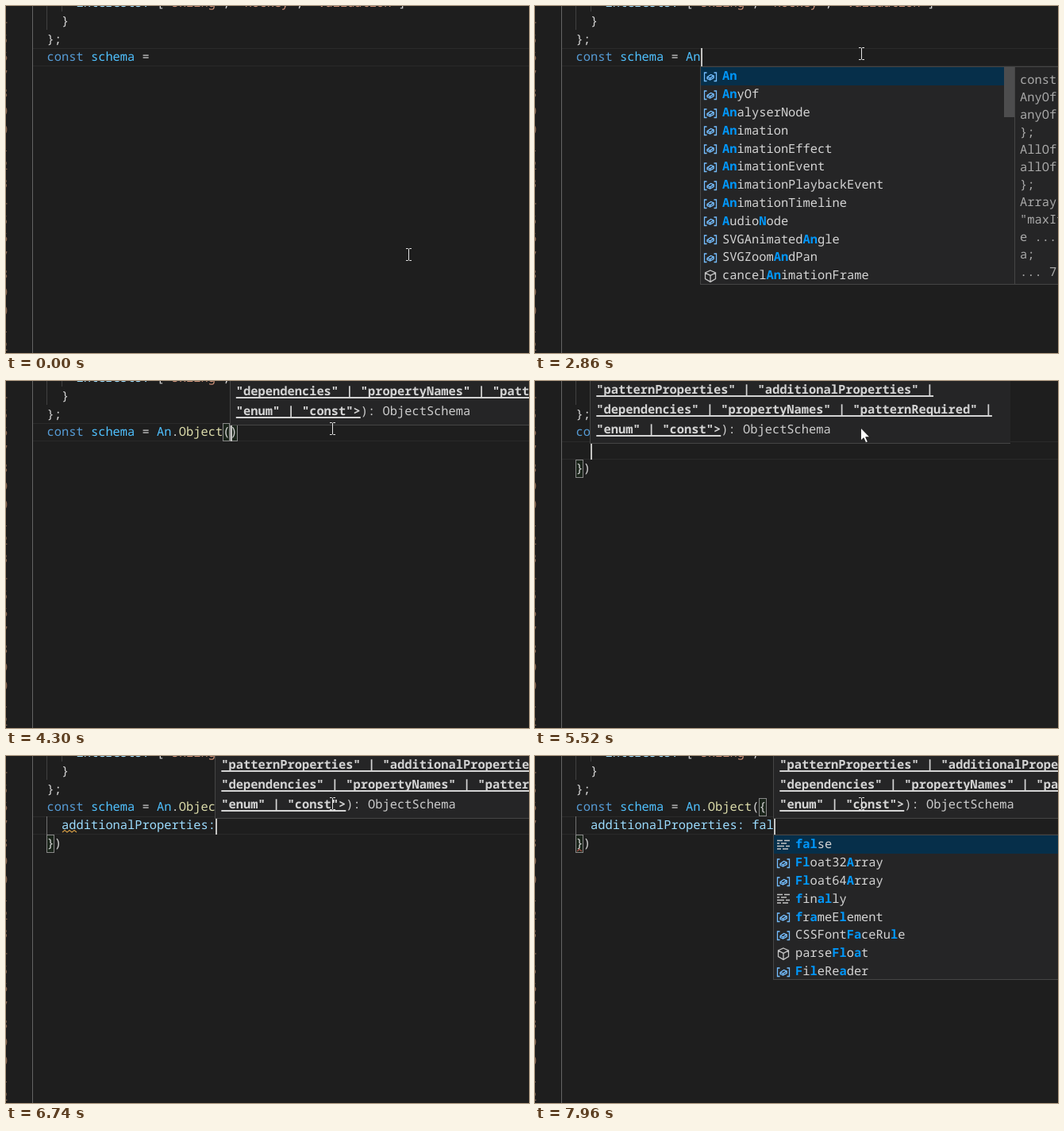
An HTML page for the animation above (8000 ms loop, 659 by 437 pixels).

```html
<!DOCTYPE html>
<html lang="en">
<head>
<meta charset="utf-8">
<title>Editor typing</title>
<style>
html, body { margin: 0; width: 100%; height: 100%; overflow: hidden; background: #1e1e1e; }
#stage {
  position: relative; width: 659px; height: 437px; overflow: hidden; background: #1e1e1e; color: #d4d4d4;
  font: 15.4px/22.8px "Noto Sans Mono", "DejaVu Sans Mono", monospace;
  text-rendering: geometricPrecision; font-variant-ligatures: none; white-space: pre;
}
#stage div, #stage svg { position: absolute; box-sizing: border-box; }
#stage svg { overflow: visible; fill: none; }
.kw { color: #569cd6; }
.var { color: #4fc1ff; }
.prop { color: #9cdcfe; }
.str { color: #ce9178; }
.fn { color: #dcdcaa; }
.num { color: #8c6a54; }
.rule { width: 1px; background: #646464; }
.guide { width: 1px; background: #404040; }
.active { background: #707070; }
.line { width: 625px; height: 23px; border: solid #2a2a2a; border-width: 1px 0; }
.match { width: 9.6px; height: 23px; border: 1px solid #888; background: rgba(0, 100, 0, .1); }
.caret { width: 2px; height: 23px; background: #c4c4c2; }
.pop { background: #252526; border: 1px solid #454545; overflow: hidden; }
.sig { width: 530px; height: 320px; border-right: 0; line-height: 25px; color: #ccc; }
.sig b { color: #d4d4d4; text-decoration: underline; text-decoration-thickness: 1.5px; text-underline-offset: 2px; text-decoration-skip-ink: none; }
.list { width: 397px; }
.row { left: 0; width: 100%; height: 22.8px; }
.row:first-child { background: #062f4a; }
.row span { position: absolute; left: 27px; top: .4px; }
.row b { color: #0097fb; }
.row svg { left: 3px; top: 4px; width: 18px; height: 16px; stroke-width: 1.3; }
.thumb { right: 0; top: 0; width: 13px; height: 63px; background: #4d4d4e; }
.docs { width: 300px; color: #a9a9a9; line-height: 22px; padding: 5px 6px; }
</style>
</head>
<body>
<div id="stage"><div id="back"></div><div id="view"></div><div id="mouse"></div></div>
<script>
const LOOP = 8000, CW = 9.24, LH = 22.8, LEFT = 51.5, TOP = 53;
const $ = id => document.getElementById(id);
const colX = col => LEFT + col * CW;
const lineY = n => TOP + n * LH;
const box = (cls, x, y, html = '', style = '') =>
  `<div class="${cls}" style="left:${x}px;top:${y}px;${style}">${html}</div>`;
const text = (n, col, html) => box('', colX(col), lineY(n) + .3, html);
const span = (cls, s) => `<span class="${cls}">${s}</span>`;

const icons = {
  v: ['#75beff', 'M4.500 3H1.500v10.500H4.500M13.500 3h3v10.500h-3M5 8.500L9.600 5.500l3.600 1.400v2.600L8.600 12 5 10.500zM5 8.500l3.600 1.300 4.600-2.900M8.600 9.800V12'],
  m: ['#c5c5c5', 'M9 1l6.500 3v7.600L9 15.400l-6.500-3.800V4zM2.500 4L9 7.400 15.500 4M9 7.400v8'],
  k: ['#c5c5c5', 'M1 2.500h7M10 2.500h7M1 6h3M6 6h7M1 9.500h9M12 9.500h5M1 13h5M8 13h7']
};

// Leading letter picks the icon; underscores toggle the matched part.
const lists = {
  a: 'v_A_n|v_A_nyOf|v_A_bortController|v_A_bortSignal|v_A_nalyserNode|v_A_nimation|v_A_nimationEffect|v_A_nimationEvent|v_A_rray|v_A_rrayBuffer|v_A_ttr|v_A_udioNode',
  an: 'v_An_|v_An_yOf|v_An_alyserNode|v_An_imation|v_An_imationEffect|v_An_imationEvent|v_An_imationPlaybackEvent|v_An_imationTimeline|v_A_udio_N_ode|vSVGAnimated_An_gle|vSVGZoom_An_dPan|mcancel_An_imationFrame',
  dot: 'mAllOf|mAnyOf|mArray|mBoolean|mInteger|mNull|mNumber|mObject|mOneOf|mString',
  ob: 'm_Ob_ject',
  p: 'v_a_dditionalProperties|v_a_llOf|v_a_nyOf|vp_a_tternProperties|vp_a_tternRequired|vdef_a_ult|v_A_n|v_A_nyOf|v_A_nalyserNode|v_A_nimation|v_A_rray|v_A_udioNode',
  pad: 'v_add_itionalProperties|m_add_EventListener',
  f: 'k_f_alse|k_f_inally|k_f_or|k_f_unction|v_F_ile|v_F_ileList|v_F_ileReader|v_F_loat32Array|v_F_loat64Array|v_F_ormData|v_f_rameElement|v_F_unction',
  fa: 'k_fa_lse|v_F_lo_a_t32Array|v_F_lo_a_t64Array|k_f_in_a_lly|v_f_r_a_meElement|vCSSFont_Fa_ceRule|mparse_F_lo_a_t|v_F_ileRe_a_der',
  fal: 'k_fal_se|v_Fl_oat32_A_rray|v_Fl_oat64_A_rray|k_f_in_al_ly|v_f_r_a_meE_l_ement|vCSSFont_Fa_ceRu_l_e|mparse_Fl_o_a_t|v_F_i_l_eRe_a_der'
};
const docs = 'const An: {\nAnyOf: (\nanyOf: [\n};\nAllOf: (\nallOf: [\n};\nArray: (\n"maxItems"\ne ... 12\na;\n... 7 more';

const obj = 'An.Object({', add = 'additionalProperties';
// t, first-line tail, caret column, then extras: second line, caret off, signature [col, line], list, docs, bracket boxes, arrow pointer
const states = [
  [0, '', 15, { off: 1 }],
  [1020, '', 15],
  [1440, '', 15, { off: 1 }],
  [1840, '', 15],
  [2440, 'A', 16, { list: 'a', docs: 1 }],
  [2860, 'An', 17, { list: 'an', docs: 1 }],
  [3080, 'An.', 18],
  [3280, 'An.', 18, { list: 'dot' }],
  [3680, 'An.Ob', 20, { list: 'ob' }],
  [3880, 'An.Object', 24],
  [4300, 'An.Object()', 25, { sig: [25, 0], match: [[0, 24], [0, 25]] }],
  [4500, obj + '})', 26, { sig: [25, 0], match: [[0, 25], [0, 26]] }],
  [4700, obj + '})', 26, { sig: [26, 0], match: [[0, 25], [0, 26]] }],
  [4920, obj + '})', 26, { off: 1, sig: [26, 0], match: [[0, 25], [0, 26]] }],
  [5320, obj, 2, { next: '', sig: [26, 0] }],
  [5520, obj, 2, { next: '', sig: [2, 1], arrow: 1 }],
  [5740, obj, 3, { next: 'a', sig: [2, 1], arrow: 1, list: 'p' }],
  [5940, obj, 5, { next: 'add', sig: [3, 1], arrow: 1, list: 'pad' }],
  [6140, obj, 22, { next: add, sig: [5, 1], arrow: 1 }],
  [6340, obj, 22, { next: add, sig: [22, 1], warn: 1 }],
  [6740, obj, 23, { next: add + ':', sig: [23, 1], warn: 1 }],
  [6940, obj, 24, { next: add + ': ', sig: [23, 1], warn: 1 }],
  [7160, obj, 25, { next: add + ': f', sig: [24, 1], list: 'f' }],
  [7360, obj, 26, { next: add + ': fa', sig: [25, 1], list: 'fa' }],
  [7560, obj, 26, { next: add + ': fa', sig: [26, 1], list: 'fa' }],
  [7760, obj, 27, { next: add + ': fal', sig: [26, 1], list: 'fal', err: 1 }],
  [7960, obj, 27, { next: add + ': fal', sig: [27, 1], list: 'fal', err: 1 }]
];

function row(item, i) {
  const [color, d] = icons[item[0]];
  const label = item.slice(1).split('_').map((s, k) => k % 2 ? `<b>${s}</b>` : s).join('');
  return `<div class="row" style="top:${i * LH}px"><svg stroke="${color}"><path d="${d}"/></svg><span>${label}</span></div>`;
}

function listBox(name, x, y, withDocs) {
  const items = lists[name].split('|');
  const h = items.length * LH + 1;
  const thumb = items.length > 11 ? '<div class="thumb"></div>' : '';
  return box('pop list', x, y, items.map(row).join('') + thumb, `height:${h}px`) +
    (withDocs ? box('pop docs', x + 396, y, docs, `height:${h}px`) : '');
}

function sigBox([col, n]) {
  const lines = [
    '<b>"patternProperties" | "additionalProperties" |</b>',
    '<b>"dependencies" | "propertyNames" | "patternRequired" |</b>',
    '<b>"enum" | "const"&gt;</b>): ObjectSchema'
  ];
  const html = lines.map((s, i) => box('', 7, 238.2 + i * 25, s)).join('');
  return box('pop sig', colX(col) - .7, Math.round(lineY(n)) + 3 - 320, html);
}

function squiggle(x, y, count, color) {
  return `<svg style="left:${x}px;top:${y}px" width="20" height="5"><path stroke="${color}" stroke-width="1.1" d="M0 3${'l3 -2.5l3 2.5'.repeat(count)}"/></svg>`;
}

function drawBack() {
  let html = box('rule', 33, 0, '', 'height:437px');
  for (let n = -2; n < 17; n++) html += box('num', -7, lineY(n) + .3, (n + 16) % 10);
  html += box('guide', 51, 0, '', 'height:30px') + box('guide', 70, 0, '', 'height:7px');
  const words = ['skiing', 'hockey', 'validation'].map(w => span('str', `"${w}"`)).join(', ');
  html += text(-3, 4, span('prop', 'interests:') + ` [${words}]`) + text(-2, 2, '}') + text(-1, 0, '};');
  $('back').innerHTML = html;
}

function drawView([, tail, col, o = {}]) {
  const second = o.next !== undefined, n = second ? 1 : 0;
  const code = tail.replace(/^An?/, s => span('var', s)).replace('Object', s => span('fn', s));
  let html = box('line', 34, Math.round(lineY(n)));
  const match = o.match || (second ? [[0, 25], [2, 0]] : []);
  html += match.map(([l, c]) => box('match', colX(c) - .5, Math.round(lineY(l)))).join('');
  html += text(0, 0, `${span('kw', 'const')} ${span('var', 'schema')} = ${code}`);
  if (second) html += text(1, 2, span('prop', o.next)) + text(2, 0, '})');
  if (o.next) html += box('guide active', 51, Math.round(lineY(1)), '', 'height:23px');
  if (o.warn) html += squiggle(71, 93, 3, '#d09a45');
  if (o.err) html += squiggle(53, 117, 1, '#b5564c');
  if (!o.off) html += box('caret', Math.round(colX(col)), Math.round(lineY(n)));
  if (o.sig) html += sigBox(o.sig);
  if (o.list) html += listBox(o.list, Math.round(colX(col) - .6), Math.round(lineY(n + 1)), o.docs);
  $('view').innerHTML = html;
  $('mouse').innerHTML = o.arrow
    ? '<svg><path fill="#fff" stroke="#111" stroke-width=".8" d="M-1 -1v16l3.6-3.3 2.7 6 2.6-1.1-2.7-5.9h5.2z"/></svg>'
    : '<svg><path stroke="#e4e4e4" d="M-3.5 -7.5h2.5l1 .8 1-.8h2.5M0 -7v14M-3.5 7.5h2.5l1-.8 1 .8h2.5"/></svg>';
}

let shown = -1;
function tick() {
  const t = performance.now() % LOOP;
  let i = states.length - 1;
  while (states[i][0] > t) i--;
  if (i !== shown) drawView(states[shown = i]);
  const step = [200, 400, 600, 800, 1020].filter(s => t >= s).length / 5;
  const p = step * step * (3 - 2 * step);
  $('mouse').style.transform = `translate(${507.5 - 96 * p}px, ${313 - 253 * p}px)`;
  requestAnimationFrame(tick);
}
drawBack();
tick();
</script>
</body>
</html>
```
